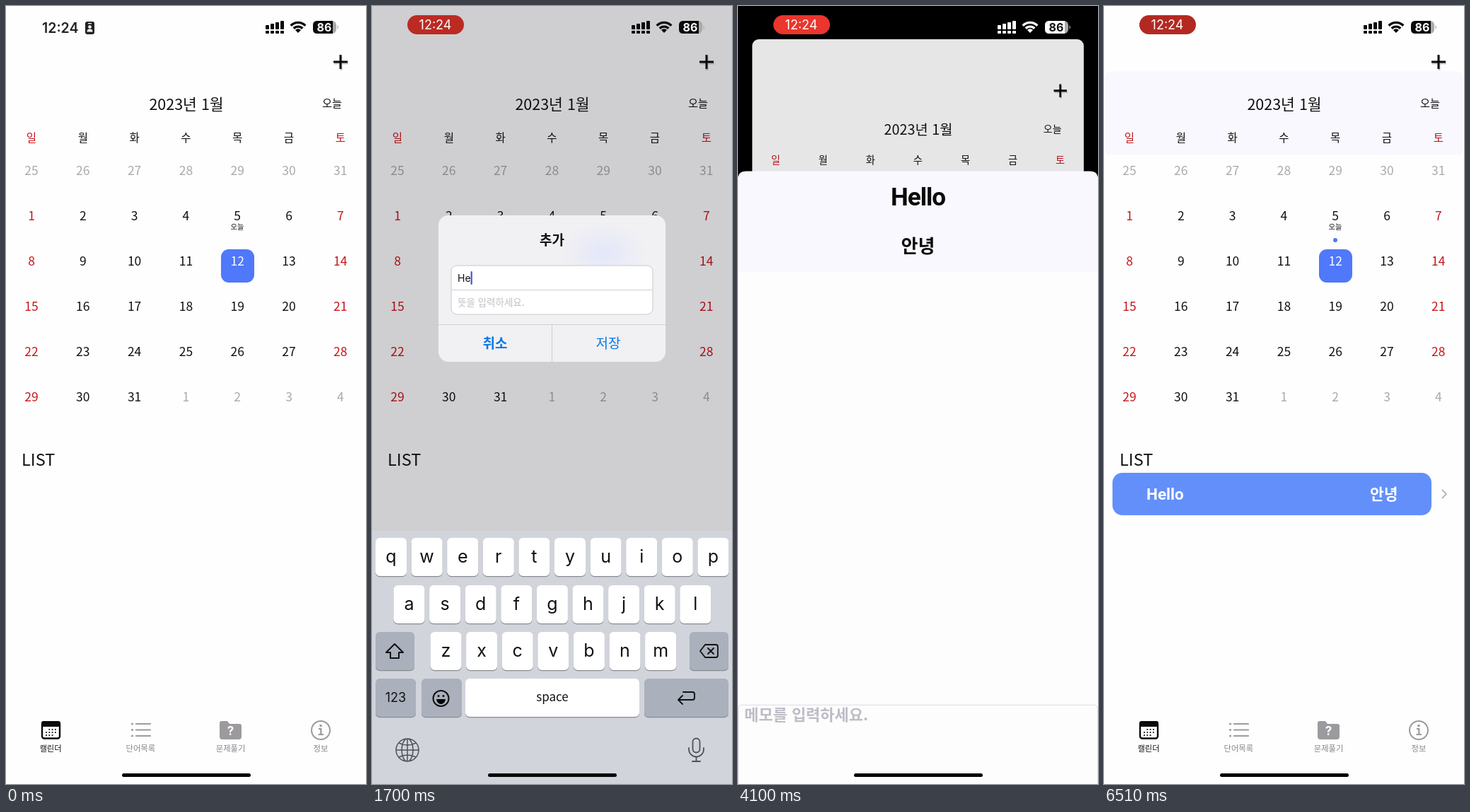
Recreate the animation shown at these times as an HTML page. Size 509 by 1100 pixels, loop 6620 ms.

```html
<!DOCTYPE html>
<html lang="ko">
<head>
<meta charset="utf-8">
<style>
html, body { margin: 0; width: 100%; height: 100%; overflow: hidden; background: #fefefe }
svg { display: block; width: 100%; height: 100%; font-family: "Noto Sans CJK KR", "Noto Sans KR", sans-serif }
.i { font-family: Inter, "Noto Sans CJK KR", sans-serif }
.r { font-family: Roboto, "Noto Sans CJK KR", sans-serif }
</style>
</head>
<body>
<svg id="stage" viewBox="0 0 509 1100"></svg>
<script>
const LOOP = 6620, RED = '#c8151a', BLUE = '#4f78fb', GREEN = '#09c85b', LINK = '#2a42b8';
const $ = id => document.getElementById(id);
const set = (id, attrs) => { for (const k in attrs) $(id).setAttribute(k, attrs[k]); };
const show = (id, on) => set(id, { visibility: on ? 'visible' : 'hidden' });
const ramp = (t, a, b) => Math.min(1, Math.max(0, (t - a) / (b - a)));
const easeOut = (x, n = 2) => 1 - (1 - x) ** n;
const range = (n, f) => Array.from({ length: n }, (_, i) => f(i)).join('');

// y is the visual middle of the text
const text = (s, x, y, size, fill = '#111', more = '') =>
  `<text x="${x}" y="${y}" dy=".36em" font-size="${size}" fill="${fill}" ${more}>${s}</text>`;
const mid = (s, x, y, size, fill, more = '') => text(s, x, y, size, fill, 'text-anchor="middle" ' + more);
const rect = (x, y, w, h, fill, r = 0, more = '') =>
  `<rect x="${x}" y="${y}" width="${w}" height="${h}" rx="${r}" fill="${fill}" ${more}/>`;
const frame = (x, y, w, h, stroke = '#ddd', r = 0, width = .7) =>
  rect(x, y, w, h, 'none', r, `stroke="${stroke}" stroke-width="${width}"`);
const dot = (x, y, r, fill) => `<circle cx="${x}" cy="${y}" r="${r}" fill="${fill}"/>`;
const line = (d, stroke, width = 1, more = '') =>
  `<path d="${d}" fill="none" stroke="${stroke}" stroke-width="${width}" ${more}/>`;
const group = (id, body, more = '') => `<g id="${id}" ${more}>${body}</g>`;
// list holds "word x" items
const words = (y, size, fill, list, more) => list.split(',').map(item => {
  const cut = item.lastIndexOf(' ');
  return text(item.slice(0, cut), item.slice(cut + 1), y, size, fill, more);
}).join('');
const BOLD = 'font-weight="700"', ROUND = 'stroke-linecap="round" stroke-linejoin="round"';
const CENTER = 'text-anchor="middle"';

function calendar() {
  const col = i => 36 + i * 72.8;
  const days = range(42, i => {
    const n = i < 7 ? 25 + i : i < 38 ? i - 6 : i - 37, c = i % 7;
    const fill = i < 7 || i > 37 ? '#aaa' : i === 18 ? '#fff' : c % 6 ? '#111' : RED;
    return mid(n, col(c), 233 + 64 * Math.floor(i / 7), 17.5, fill);
  });
  const tabs = ['캘린더', '단어목록', '문제풀기', '정보'];
  const g = '#9c9a9e';
  return rect(0, 0, 509, 1100, '#fefefe', 10)
    + group('band', '<path d="M2 210V102q0-10 10-10H497q10 0 10 10V210z" fill="#f8f8fe"/>')
    + line('M464 81H484M474 71V91', '#ccc', 3) + line('M463 79H483M473 69V89', '#0a0a0a', 3)
    + mid('2023년 1월', 255, 139, 21.5) + mid('오늘', 461, 138, 15.2)
    + range(7, i => mid('일월화수목금토'[i], col(i), 186, 15.5, i % 6 ? '#111' : RED))
    + rect(304, 344, 47, 47, BLUE, 11) + days + mid('오늘', 327, 312, 10.3)
    + text('LIST', 22, 642, 23.5)
    + group('entry', dot(327, 331, 3, BLUE) + rect(12, 660, 451, 60, '#628ffa', 14)
      + text('Hello', 60, 690, 22.5, '#fff', 'class="r" ' + BOLD) + text('안녕', 376, 690, 21.5, '#fff', BOLD)
      + line('M478 684l6 6-6 6', '#b5b5b8', 1.8))
    + frame(51, 1012.5, 25, 23, '#0a0a0a', 3, 2.4) + rect(50, 1011, 27, 8, '#0a0a0a', 3)
    + range(12, i => i === 0 || i === 11 ? '' : dot(57 + i % 4 * 4.3, 1023 + Math.floor(i / 4) * 4, 1.1, '#111'))
    + range(3, i => dot(178.5, 1015 + 8.5 * i, 1.6, g) + line(`M184 ${1015 + 8.5 * i}H204`, g, 2.2, ROUND))
    + `<path d="M302 1014q0-3 3-3h8l3 4h14q3 0 3 3v15q0 4-4 4h-23q-4 0-4-4z" fill="${g}"/>`
    + mid('?', 317.5, 1025, 17, '#fff', 'class="i" ' + BOLD)
    + `<circle cx="445" cy="1024" r="13" fill="none" stroke="${g}" stroke-width="2"/>`
    + dot(445, 1017.5, 1.8, g) + line('M442 1022h3.3v8M441.500 1030h7.500', g, 2.2)
    + range(4, i => mid(tabs[i], 63 + 127.3 * i, 1050, 11.3, i ? '#88868a' : '#111'));
}

const KOREAN = ['ㅂㅈㄷㄱㅅㅛㅕㅑㅐㅔ', 'ㅁㄴㅇㄹㅎㅗㅓㅏㅣ', 'ㅋㅌㅊㅍㅠㅜㅡ'];
const ENGLISH = ['QWERTYUIOP', 'ASDFGHJKL', 'ZXCVBNM'];
const KEY_LEFT = [5, 30.5, 82.5], KEY_TOP = [752, 819, 885];
const keyX = (r, i) => KEY_LEFT[r] + i * 50.6;

function keyboard() {
  const key = (x, y, w, fill = '#fff') => rect(x, y + 1.3, w, 54, '#898c92', 6) + rect(x, y, w, 54, fill, 6);
  const dark = '#aab0bc', ink = '#111';
  return rect(0, 742, 509, 358, '#d1d4db')
    + KOREAN.map((row, r) => range(row.length, i => key(keyX(r, i), KEY_TOP[r], 44)
      + mid('', keyX(r, i) + 22, KEY_TOP[r] + 26, 25, ink, `class="i" id="k${r}${i}"`))).join('')
    + key(5, 885, 55, dark) + rect(5, 885, 55, 54, '#fff', 6, 'id="shift"') + key(449, 885, 55, dark)
    + key(5, 951, 57, dark) + key(70, 951, 57, dark) + key(132, 951, 246) + key(385, 951, 119, dark)
    + line('M32 902l12 12h-6v8h-12v-8h-6z', ink, 2, ROUND + ' id="arrow"')
    + line('M464 912l7-9h15q3 0 3 3v12q0 3-3 3h-15zM475 908l8 8M483 908l-8 8', ink, 1.8, ROUND)
    + mid('123', 33.5, 978, 18, ink, 'class="i"')
    + `<circle cx="97.500" cy="979" r="11" fill="none" stroke="${ink}" stroke-width="2"/>`
    + dot(94, 975.5, 1.6, ink) + dot(101, 975.5, 1.6, ink)
    + '<path d="M91 980h13q-1 7-6.500 7t-6.500-7z"/>'
    + mid('', 255, 977, 17, ink, 'id="space"')
    + line('M440 970h13q3 0 3 3v5q0 3-3 3h-20M439 975l-6 6 6 6', ink, 1.9, ROUND)
    + line('M34 1052a16 16 0 0 1 32 0a16 16 0 0 1-32 0H66M50 1036v32M42 1052a8 16 0 0 1 16 0a8 16 0 0 1-16 0M38 1042q12 6 24 0M38 1062q12-6 24 0', '#505258', 1.5)
    + frame(453.5, 1035.5, 10, 20, '#505258', 5, 1.8)
    + line('M448 1049v2a10.500 10.500 0 0 0 21 0v-2M458.500 1062v6M453 1068h11', '#505258', 1.8, ROUND)
    + group('pop', rect(-8, -64, 60, 62, '#fff', 10) + rect(0, -8, 44, 62, '#fff', 6)
      + mid('', 22, -34, 36, ink, 'class="i" id="popText"'), 'style="filter:drop-shadow(0 1px 3px #0005)"');
}

function alertBox() {
  return rect(94, 296, 321, 207, '#f1f0f3', 14)
    + '<radialGradient id="tint"><stop stop-color="#e3e7fa"/><stop offset="1" stop-color="#f1f0f3"/></radialGradient>'
    + '<ellipse cx="328" cy="350" rx="60" ry="45" fill="url(#tint)"/>'
    + mid('추가', 254.5, 331, 19, '#111', BOLD)
    + rect(112, 367, 285, 69, '#fff', 8, 'stroke="#c9c8cc"') + line('M112 401.500H397', '#d0cfd3')
    + text('단어를 입력하세요.', 121, 384, 13.5, '#c0bfc4', 'id="hint1"')
    + text('뜻을 입력하세요.', 121, 419, 13.5, '#c0bfc4', 'id="hint2"')
    + text('', 121, 385, 14, '#111', 'class="i" id="field1"') + text('', 121, 419, 13.5, '#111', 'id="field2"')
    + rect(121, 375, 2.2, 19, '#4657cf', 1, 'id="caret"')
    + line('M94 450.500H415M254.500 451V503', '#cfced2')
    + mid('취소', 174, 477, 19, '#0a78e8', BOLD) + mid('저장', 334, 477, 19, '#0a78e8');
}

function speakers(y) {
  const flag = (x, body) => `<svg x="${x - 6}" y="${y - 6}" width="12" height="12" viewBox="0 0 12 12"><g clip-path="url(#disc)">${body}</g></svg>`;
  const cross = line('M0 0L12 12M12 0L0 12M6 0V12M0 6H12', '#fff', 3) + line('M6 0V12M0 6H12', '#d5202f', 1.6);
  const navy = rect(0, 0, 12, 12, '#23367f');
  return frame(15, y - 7, 28, 14, '#eee', 7)
    + `<path d="M20 ${y - 1.5}h2l3-2.500v8l-3-2.500h-2z" fill="#223c8c"/>` + line(`M26.500 ${y - 2}q2 2 0 4`, '#223c8c')
    + text('All', 30, y, 7, '#223c8c', BOLD)
    + flag(54, rect(0, 0, 12, 12, '#fff') + range(4, i => rect(0, i * 3.4, 12, 1.7, '#c8303c')) + rect(0, 0, 6, 6, '#2c3f88'))
    + flag(72, navy + cross)
    + flag(90, navy + `<g transform="scale(.55)">${cross}</g>` + dot(8, 8, 1, '#fff') + dot(9, 3, .8, '#fff'))
    + flag(108, rect(0, 0, 12, 4, '#f28c28') + rect(0, 4, 12, 4, '#fff') + rect(0, 8, 12, 4, '#2b8a3e') + dot(6, 6, 1.2, '#3849a0'));
}

function mainColumn() {
  const gray = '#8a8a8e';
  const mark = (x, y, w) => rect(x, y - 7, w, 14, '#e2eefc');
  const tag = y => text('감탄사, 명사', 14, y, 6, '#7c86b0');
  const story = ['Greeting used by an obnoxious co-worker to answer the phone.',
    'Generally it is bellowed loudly for all to hear, as if others should be',
    'interested in their conversations. The first HELLO! is usually followed by',
    'a second, slightly quieter Helloo! Co-workers that tend to do this often', 'wear slacks tha...'];
  return rect(0, 234, 490, 28, GREEN)
    + text('VODRI', 10, 248, 8, '#fff', 'font-weight="900"') + text('사전', 43, 248, 11, '#fff')
    + words(248, 8, '#fff', '두루새 75,누리말집 TOP 107,참여번역 166,배움곳간 207')
    + frame(434, 241, 26, 13, '#7fe0aa') + mid('로그인', 447, 248, 5, '#fff')
    + range(9, i => rect(481 + i % 3 * 3, 244 + Math.floor(i / 3) * 3, 1.7, 1.7, '#fff'))
    + words(271, 5.4, '#222', '사전홈 18,국어 61,한자 81,일본어 104,중국어 130,프랑스어 158,스페인어 189,독일어 217,영영 239,더보기 262', CENTER)
    + mid('영어', 41, 271, 5.6, GREEN, CENTER + BOLD) + text('N', 272, 271, 5.4, '#f0404a')
    + text('언어설정', 456, 271, 5.4, gray) + text('한국어 ·', 478, 271, 5.4, '#333')
    + rect(35, 279, 11, 1.5, GREEN) + line('M0 283H509', '#eee')
    + text('영어사전', 0, 306, 11) + frame(51, 297, 194, 19, GREEN, 0, 1.6) + text('Hello', 59, 306.5, 10.8)
    + `<path d="M236 305h4l-2 2.500z" fill="${GREEN}"/>` + rect(245, 296, 20, 21, GREEN)
    + line('M258 306a3 3 0 1 0-6 0a3 3 0 1 0 6 0M257 308l3 3', '#fff', 1.2)
    + frame(273, 299, 30, 14, '#8ddfb0') + mid('고급 검색', 288, 306, 5.6, GREEN)
    + line('M0 331.500H490', '#444', 1.4) + line('M357.500 332V846', '#eee')
    + text('전체', 7, 344, 6.4, GREEN, BOLD) + rect(7, 353, 12, 1.6, GREEN)
    + words(344, 6.3, '#777', '단어·숙어 33,뜻풀이 72,예문 104,유의어 130,영영사전 162')
    + range(5, i => line(`M${[26, 65, 97, 123, 155][i]} 341v6`, '#ddd', .7))
    + range(3, i => frame(305 + 13 * i, 338, 12, 11, i ? '#ccc' : GREEN)
      + mid('T', 311 + 13 * i, 344, 6 + i, i ? '#999' : GREEN, BOLD))
    + line('M7 355.500H343', '#e2e2e2', .8) + text('연관검색어', 8, 366, 5.8, '#111', BOLD)
    + words(366, 6.6, '#3b4fae', 'hi 44,here 60,have 84,happy 109,안녕 138,good 160,sorry 186,bye 214,what 235,hand 260,he 285,girl 304,go 323')
    + words(376, 6.6, '#3b4fae', 'great 8,head 33,how 60,yes 82,hear 103,thank 128,hi 155') + line('M7 386H343', '#ddd', .8)
    + text('단어·숙어', 8, 405, 9.6, '#111', BOLD) + text('74', 50, 404, 5.5, gray)
    + text('글로벌 발음듣기', 281, 405, 6.4) + rect(327, 401, 15, 8, '#2894f0', 4) + dot(338, 405, 4, '#fff')
    + `<circle cx="338" cy="405" r="4" fill="none" stroke="#2894f0"/>`
    + text('hello ( hallo, hullo )', 8, 432, 11.6, LINK)
    + line('M111 432a2 2 0 1 0-4 0a2 2 0 1 0 4 0h7v2M115 432v2', '#3690e0', 1.1)
    + text('★★', 121, 432, 8.5, '#e2404a') + dot(146, 432, 4, '#ccc')
    + words(446, 6, '#333', '1. 7') + tag(449) + text('(만났을 때의 인사로) 안녕(하세요), 인사, (전화에서나 남의 관심을 끌', 52, 447, 10.2)
    + text('때) 여보세요', 15, 462, 10.2) + words(477, 6, '#333', '2. 7') + tag(478) + text('옛 이런, 어머나(놀라움을 나타냄)', 52, 478, 6.2)
    + words(491, 6, '#333', '3. 7') + tag(494) + text('비격식', 53, 493, 10.2, gray)
    + text('얼씨구(상대방의 말이 바보 같거나, 상대방이 주의를 기울이지', 86, 493, 10.2)
    + text('않고 있다고 여길 때) (→golden ...', 15, 508, 10.2)
    + words(532, 6.6, '#666', "미국식 [ hə'loʊ ] 15,영국식 [ hə'ləʊ ] 66") + speakers(551)
    + range(5, i => dot(127 + 9 * i, 551, 4.6, ['#b89a80', '#b8dce4', '#6b7480', '#4d6275', '#313842'][i]))
    + text('23', 170, 551, 7.2, '#555') + text('브렌워스 영한사전', 8, 571, 5.6, gray)
    + mark(8, 600, 27) + text('Hello (not an acronym)', 8, 600, 11.6, LINK) + dot(134, 600, 4, '#ccc')
    + text('Chat', 8, 614, 6.6, gray) + text('(Abbr.) ELLO.', 26, 614, 7.1, '#333')
    + frame(8, 623, 45, 12) + dot(14, 629, 2.7, '#30a5f0') + text('두루새번역', 20, 629, 5.8, '#666') + speakers(652)
    + text('Quibletterms.com', 8, 673, 6.4, gray)
    + mark(8, 701, 39) + text('HELLO!', 8, 701, 11.6, LINK) + frame(53, 696, 20, 9) + mid('필수어', 63, 701, 5, '#bbb')
    + mark(205, 748, 37) + story.map((s, i) => text(s, 8, 717 + 15.4 * i, 11.4, '#222')).join('')
    + speakers(803) + text('Streetlexipedia', 8, 825, 6.4, gray) + frame(55, 822, 5, 5, '#bbb');
}

function sideColumn() {
  const gray = '#8a8a8e';
  const button = (y, s) => frame(369, y, 120, 19) + mid(s, 429, y + 10, 6.8, '#555');
  return words(344, 5.9, '#333', '단어장 369,영영사전 400,작은창 사전 437') + words(357, 5.9, '#333', '누리말집 369,퀴즈 407')
    + rect(369, 380, 120, 120, '#cbc8c5') + rect(400, 380, 60, 11, '#8b8988', 4) + mid('영어 신조어 퀴즈 3', 430, 385, 6.2, '#fff')
    + mid('남자가 My man을 말할 때?', 429, 402, 9.2, '#111', BOLD)
    + rect(421, 411, 34, 13, '#8ee8f4') + mid('Boy: What is My man doing?', 428, 417, 8.6)
    + dot(393, 445, 9, '#74563f') + rect(385, 453, 17, 21, '#e3c65f', 6) + rect(378, 455, 9, 18, '#8eabc0', 3)
    + line('M389 472l-3 16M398 472l6 13', '#6583a5', 6, ROUND) + line('M400 457l9-8', '#e3c65f', 5, ROUND)
    + rect(413, 432, 72, 42, '#fff') + range(4, i => dot(414, 437 + 10 * i, 1.5, '#e5b04a'))
    + ['1. 내 남자', '2. 내 친구', '3. 내 남편'].map((s, i) => text(s, 422, 442 + 10.3 * i, 7.4, '#111', BOLD)).join('')
    + rect(426, 479, 46, 14, '#fff', 7) + mid('정답확인 &gt;', 449, 486, 6.6, '#111', BOLD)
    + text('내가 찾은 단어', 369, 516, 6.2, '#111', BOLD) + rect(369, 529, 30, 14, '#f1f1f3') + text('Hello', 372, 536, 6.6)
    + text('×', 390, 536, 7, gray) + rect(369, 551, 15, 7, '#ddd', 3.5) + dot(373, 554.5, 3.5, '#fff')
    + words(555, 5.6, '#aaa', '자동저장 386,모두저장 440,모두삭제 468') + button(569, '내 단어장 가기') + button(614, '약어표 보기')
    + text('사전 사용팁', 369, 663, 6.2, '#111', BOLD) + frame(471, 658, 9, 9) + frame(480, 658, 9, 9)
    + '<path d="M477 660.500v4l-3-2zM483 660.500v4l3-2z"/>'
    + `<g transform="rotate(-4 428 697)">${frame(413, 680, 29, 33, '#eca982', 2, 1.6)}${rect(413, 680, 29, 12, '#fbdcc4')}${mid('STUDY', 428, 686, 6.5, '#d97c50', BOLD)}</g>`
    + line('M424 714l24-25', '#f0b48c', 5) + line('M421 717l3-3', '#b56a45', 2)
    + mid('“학습 정보” 활용하기', 429, 729, 7.4) + mid('영어의 다양한 용법을', 429, 742, 6, gray) + mid('유형별로 공부해보세요.', 429, 750, 6, gray)
    + frame(369, 781, 120, 38, '#e5e5e5') + text('든든한 번역 파트너 두루새', 378, 794, 6.7, '#2577e8', BOLD)
    + text('맥락까지 이해하는 번역기', 378, 805, 5.7, gray) + dot(472, 800, 11, '#30a5f0')
    + frame(369, 829, 120, 38, '#e5e5e5') + text('소리 조각으로 배우는', 378, 836, 6.8, '#222', BOLD)
    + text('신나는 영어강의', 378, 846, 6.8, GREEN, BOLD) + dot(472, 842, 11, '#4a4f4c')
    + rect(480, 818, 18, 18, '#fff', 0, 'stroke="#ddd"') + line('M485 829l4-4 4 4', '#777');
}

function sheet() {
  return rect(0, 68, 509, 1042, '#fdfdfe', 11)
    + '<path d="M0 210V79q0-11 11-11H498q11 0 11 11V210z" fill="#f8f8fe"/>'
    + mid('Hello', 254.5, 104, 35, '#0a0a0a', `class="r" letter-spacing="-1" ${BOLD}`)
    + mid('안녕', 254.5, 174, 26, '#0a0a0a', BOLD)
    + group('spinner', range(8, i => `<path id="spoke${i}" d="M254.500 577v-3.500" stroke-width="3.200" stroke-linecap="round" transform="rotate(${45 * i} 254.500 584)"/>`))
    + group('web', `<g class="r" transform="translate(0 -24)">${rect(0, 234, 509, 612, '#fefefe')}${mainColumn()}${sideColumn()}</g>`, 'clip-path="url(#page)"')
    + rect(.5, 822.5, 508, 236.5, '#fdfdfe', 5, 'stroke="#dcdbe0"')
    + text('메모를 입력하세요.', 9, 836, 22, '#bebcc5', BOLD);
}

function status() {
  const arc = r => `M${413 - .71 * r} ${38 - .71 * r}A${r} ${r} 0 0 1 ${413 + .71 * r} ${38 - .71 * r}`;
  return group('clock', text('12:24', 51, 31, 19.5, '#222', 'class="i" font-weight="600"')
    + rect(112, 22, 13, 18, '#222', 3) + dot(118.5, 29.5, 2.3, '#fff') + '<path d="M114.500 36.500q0-4 4-4t4 4z" fill="#fff"/>' + rect(116, 24, 5, 1.3, '#fff'))
    + group('pill', rect(50, 13, 80, 27, '#ff3b30', 13.5, 'id="pillBody"')
      + group('rec', `<circle cx="89.500" cy="26.500" r="8" fill="none" stroke="#fff" stroke-width="1.700"/>` + dot(89.5, 26.5, 4.4, '#fff'))
      + mid('12:24', 89.5, 27, 18, '#fff', 'class="i" id="pillTime"'))
    + group('icons', range(4, i => rect(367 + 7 * i, 27 - 2 * i, 5, 6 + 2 * i, 'currentColor', 1) + rect(367 + 7 * i, 35, 5, 4, 'currentColor', 1))
      + line(arc(14.5), 'currentColor', 3.4) + line(arc(8.8), 'currentColor', 3.4)
      + '<path d="M413 38l-4-4a5.600 5.600 0 0 1 8 0z" fill="currentColor"/>'
      + rect(434, 21, 33, 18, '#aaa', 6) + '<path d="M462 21H440q-6 0-6 6v6q0 6 6 6h22z" fill="currentColor"/>'
      + '<path d="M468.500 27q3 3 0 6z" fill="#aaa"/>'
      + mid('86', 450, 30, 16, '#fff', 'class="i" font-weight="700" id="charge"'));
}

$('stage').innerHTML = '<clipPath id="disc"><circle cx="6" cy="6" r="5.600"/></clipPath><clipPath id="page"><rect y="210" width="509" height="612"/></clipPath>'
  + rect(0, 0, 509, 1100, '#000', 0, 'id="back"') + group('card', calendar())
  + rect(0, 0, 509, 1100, '#08000c', 0, 'id="dim"') + group('sheet', sheet())
  + group('alert', alertBox()) + group('keys', keyboard()) + status() + rect(164, 1085, 182, 5, '#050505', 2.5);

// time, key, field content after the press
const WORD = [[1500, 'H', 'H'], [1600, 'E', 'He'], [1720, 'L', 'Hel'], [1840, 'L', 'Hell'], [1960, 'O', 'Hello']];
const MEANING = [[2850, 'ㅇ', 'ㅇ'], [2900, 'ㅏ', '아'], [2950, 'ㄴ', '안'], [3000, 'ㄴ', '안ㄴ'], [3050, 'ㅕ', '안녀'], [3100, 'ㅇ', '안녕']];
const PULSE = [[0, 0], [900, 0], [1800, .3], [2700, .12], [3400, 0], [4500, .13], [5500, 0], [6510, .3], [LOOP, .3]];
const typed = (list, t) => list.filter(p => p[0] <= t).pop();

function drawKeys(t) {
  const english = t >= 1200 && t < 2400, upper = t < 1500, rows = english ? ENGLISH : KOREAN;
  rows.forEach((row, r) => [...row].forEach((c, i) => { $(`k${r}${i}`).textContent = upper ? c : c.toLowerCase(); }));
  $('space').textContent = !english ? (t >= 2400 && t < 2850 ? '한국어' : '스페이스') : t < 1500 ? 'English (US)' : 'space';
  show('shift', english && upper);
  set('arrow', { fill: english && upper ? '#111' : 'none' });
  const last = typed([...WORD, ...MEANING], t), down = last && t - last[0] < 80;
  show('pop', down);
  if (!down) return;
  const r = rows.findIndex(row => row.includes(last[1]));
  $('popText').textContent = upper || t < 1600 ? last[1] : last[1].toLowerCase();
  set('pop', { transform: `translate(${keyX(r, rows[r].indexOf(last[1]))} ${KEY_TOP[r]})` });
}

function drawAlert(t) {
  const shown = Math.min(easeOut(ramp(t, 300, 600)), 1 - ramp(t, 3150, 3410));
  const scale = 1 + .15 * (1 - easeOut(ramp(t, 300, 600)));
  set('alert', { opacity: shown, transform: `translate(254.5 399.5) scale(${scale}) translate(-254.5 -399.5)` });
  [WORD, MEANING].forEach((list, i) => {
    const p = typed(list, t);
    $(`field${i + 1}`).textContent = p ? p[2] : '';
    show(`hint${i + 1}`, !p);
  });
  const second = t >= 2200;
  set('caret', { x: 121 + $(second ? 'field2' : 'field1').getComputedTextLength(), y: second ? 409 : 375 });
  const up = easeOut(ramp(t, 250, 650), 3) - easeOut(ramp(t, 3150, 3550));
  set('keys', { transform: `translate(0 ${358 * (1 - up)})` });
  show('keys', up > 0);
  return shown;
}

function drawStatus(t, open) {
  const dark = open > .5, i = PULSE.findIndex(p => p[0] > t);
  const [a, b] = [PULSE[i - 1], PULSE[i]], k = 1 - a[1] - (b[1] - a[1]) * ramp(t, a[0], b[0]);
  set('pillBody', { fill: `rgb(${[255, 59, 48].map(c => Math.round(c * k))})` });
  show('clock', t < 200);
  show('pill', t >= 200);
  set('rec', { opacity: t < 1700 ? 1 : 0 });
  set('pillTime', { opacity: t < 1700 ? 0 : 1 });
  set('icons', { color: dark ? '#fff' : '#0a0a0a' });
  set('charge', { fill: dark ? '#111' : '#fff' });
}

function draw(now) {
  const t = now % LOOP;
  const open = easeOut(ramp(t, 3850, 4400), 3) - ramp(t, 5300, 5900) ** 3.42;
  const alertShown = drawAlert(t);
  drawKeys(t);
  drawStatus(t, open);
  show('back', open > 0);
  show('entry', t >= 3550);
  show('band', t >= 5900);
  set('card', { transform: `translate(${24 * open} ${56 * open}) scale(${1 - 48 / 509 * open})` });
  set('dim', { opacity: .19 * alertShown + .11 * open });
  set('sheet', { transform: `translate(0 ${1032 * (1 - open)})` });
  show('sheet', open > 0);
  set('web', { opacity: t >= 4850 ? 1 : 0 });
  set('spinner', { opacity: t >= 4200 && t < 4850 ? 1 : 0 });
  const head = 5 + Math.floor((t - 4600) / 100);
  for (let i = 0; i < 8; i++) {
    const age = ((head - i) % 8 + 8) % 8, c = Math.min(222, 152 + 20 * age);
    set(`spoke${i}`, { stroke: `rgb(${c},${c},${c})` });
  }
}

const start = performance.now();
(function tick() {
  draw(performance.now() - start);
  requestAnimationFrame(tick);
})();
</script>
</body>
</html>
```
